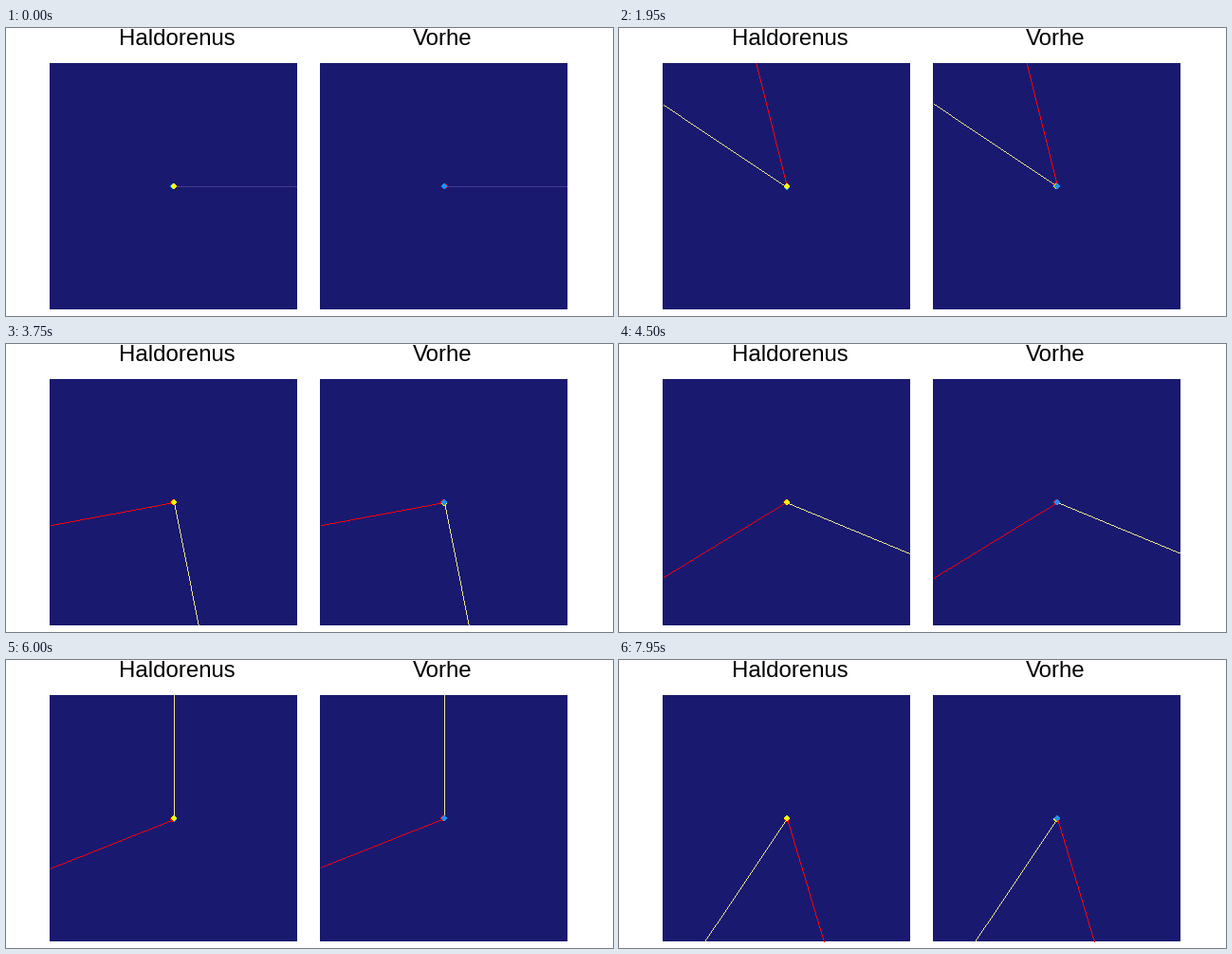
A matplotlib script that plays this animation: 640 by 304 pixels, repeating every 8000 ms.

```python
import numpy as np
import matplotlib.pyplot as plt
from matplotlib.animation import FuncAnimation
from matplotlib.colors import to_rgb

W, H, DPI = 640, 304, 100
BOX_W, BOX_H, BOX_TOP = 261, 260, 37
CENTRE = np.array([130.6, 130.25])   # from the box's top left corner
AU = 0.5                             # orbit of the earth in pixels
MARS_RADIUS, MARS_YEAR = 1.524, 1.881
STEPS_PER_YEAR = 32
FRAME_MS, FRAMES_PER_STEP, FRAMES = 50, 3, 160
DOT_RADIUS = 3


def rgb(name):
    return np.round(255 * np.array(to_rgb(name))).astype(np.uint8)


WHITE, NIGHT, SUN, EARTH, MARS, SUN_RAY, SHARED_RAY = map(rgb, (
    "white", "midnightblue", "yellow", "dodgerblue", "red", "khaki",
    "darkslateblue"))

ROWS, COLS = np.mgrid[:H, :W]


def orbit(turns, radius=1.0):
    angle = 2 * np.pi * turns
    return radius * np.array([np.cos(angle), -np.sin(angle)])


def draw_dot(stage, place, color):
    """Hard-edged dot centred on a pixel corner."""
    x, y = np.rint(place)
    stage[abs(COLS + 0.5 - x) + abs(ROWS + 0.5 - y) <= DOT_RADIUS] = color


def draw_ray(stage, left, start, aim, color):
    """One-pixel line from start to the edge of the box at left."""
    steps = np.arange(BOX_W)[:, None]
    points = np.rint(np.rint(start) + steps * aim / abs(aim).max())
    x, y = points.astype(int).T
    inside = ((x > left) & (x < left + BOX_W)
              & (y >= BOX_TOP) & (y <= BOX_TOP + BOX_H))
    stage[y[inside], x[inside]] = color


def draw_panel(stage, left, sun_centred, step):
    """Planets in one box, with sight lines from the earth."""
    stage[BOX_TOP:BOX_TOP + BOX_H, left:left + BOX_W] = NIGHT
    to_sun = orbit(step / STEPS_PER_YEAR)
    to_mars = to_sun + orbit(step / STEPS_PER_YEAR / MARS_YEAR, MARS_RADIUS)

    earth = CENTRE + (left, BOX_TOP)
    if sun_centred:
        earth = earth - AU * to_sun
    sun, mars = earth + AU * to_sun, earth + AU * to_mars

    # Both sight lines coincide at the start.
    draw_ray(stage, left, earth, to_sun, SUN_RAY if step else SHARED_RAY)
    draw_ray(stage, left, earth, to_mars, MARS if step else SHARED_RAY)

    dots = [(earth, EARTH), (mars, MARS), (sun, SUN)]
    if not sun_centred:
        dots.reverse()
        dots[0], dots[1] = dots[1], dots[0]
    for place, color in dots:
        draw_dot(stage, place, color)


def render(step):
    stage = np.empty((H, W, 3), np.uint8)
    stage[:] = WHITE
    draw_panel(stage, 46, True, step)
    draw_panel(stage, 331, False, step)
    return stage


fig = plt.figure(figsize=(W / DPI, H / DPI), dpi=DPI, facecolor="white")
picture = fig.figimage(render(0), origin="upper")
for title, x in (("Haldorenus", 180), ("Vorhe", 460)):
    fig.text(x / W, 1 - 18.5 / H, title, ha="center", va="baseline",
             family="Liberation Sans", size=24 * 72 / DPI)


def draw(frame):
    picture.set_data(render(frame // FRAMES_PER_STEP))
    return [picture]


anim = FuncAnimation(fig, draw, frames=FRAMES, interval=FRAME_MS,
                     init_func=lambda: draw(0), repeat=True, repeat_delay=0)
plt.show()
```
